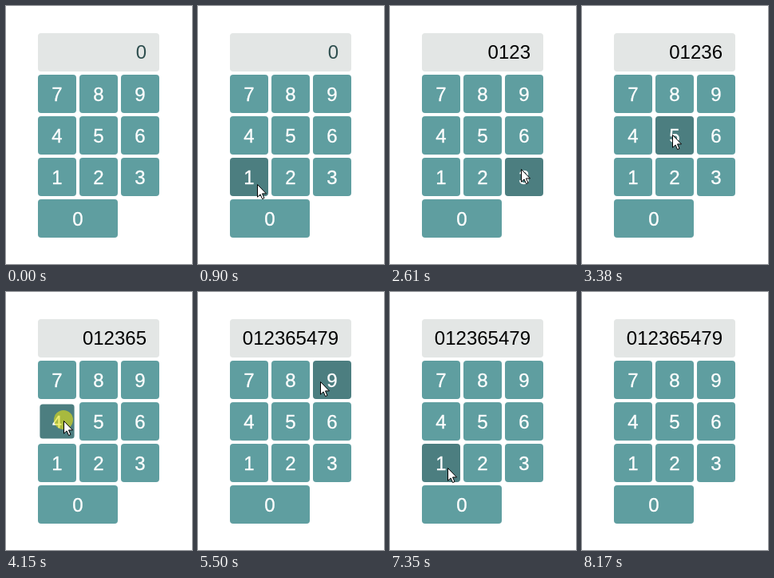
Recreate the animation shown at these times as an HTML page. Size 233 px wide and 323 px high, loop 9.9 s.

```html
<!DOCTYPE html>
<html lang="en">
<head>
<meta charset="utf-8">
<title>Keypad</title>
<style>
  html, body { margin: 0; width: 100%; height: 100%; overflow: hidden; background: #fff; }
  body { position: relative; font: 24px/48px "Liberation Sans", Arial, sans-serif; }
  div, svg { position: absolute; }
  #display {
    left: 40px; top: 34px; width: 136px; height: 48px; padding-right: 16px;
    border-radius: 4px; background: #e3e6e5; text-align: right;
  }
  .key {
    height: 48px; border-radius: 4px; background: #5f9ea0;
    color: #fff; line-height: 50px; text-align: center; -webkit-text-stroke: .3px #fff;
  }
  .key.hover { background: #4c7e80; }
  .key.down { transform: scale(.9); }
  #spot {
    left: -12px; top: -12px; width: 24px; height: 24px;
    border-radius: 50%; background: rgba(230, 225, 20, .6);
  }
  #pointer { left: 0; top: 0; }
  #pointer svg { left: 0; top: 1px; overflow: visible; }
</style>
</head>
<body>
<div id="display">0</div>
<div id="pointer">
  <div id="spot"></div>
  <svg width="13" height="20">
    <path d="M.5 .5V16.2L4.1 12.9 6.6 18.6 9 17.5 6.5 11.9H11.5Z" fill="#fff" stroke="#000"/>
  </svg>
</div>
<script>
const LOOP = 9900;
const TYPED = '12365479', FIRST = 1100, BEAT = 610, PRESS = 110;
const TOUR = '965210', TOUR_START = 5850, TOUR_BEAT = 370, REST = 100;
const OUTSIDE = [152, 318];

const display = document.getElementById('display');
const pointer = document.getElementById('pointer');
const spot = document.getElementById('spot');

// Column and row of a digit; row 0 holds 1 2 3, row -1 holds 0
const cell = n => n ? [(n - 1) % 3, Math.floor((n - 1) / 3)] : [0, -1];

const keys = Array.from({ length: 10 }, (_, n) => {
  const [col, row] = cell(n);
  const x = 40 + col * 52, y = 190 - row * 52, w = n ? 48 : 100;
  const el = document.createElement('div');
  el.className = 'key';
  el.textContent = n;
  el.style.cssText = `left:${x}px;top:${y}px;width:${w}px`;
  document.body.insertBefore(el, pointer);
  return { el, x, y, w };
});

// Where the hand rests on a key
function aim(n) {
  if (!n) return [122, 270];
  const [col, row] = cell(n);
  return [72 + col * (row ? 40.5 : 48), [219, 160, 111][row]];
}

// Stops as [time, point]: typing on a steady beat, then a swinging sweep back
function buildPath() {
  const path = [[540, OUTSIDE]];
  const stay = (from, to, point) => path.push([from, point], [to, point]);

  [...TYPED].forEach((d, i) => {
    const click = FIRST + i * BEAT;
    stay(click - 160, click + 210, aim(+d));
  });
  [...TOUR].forEach((d, i) => {
    const at = TOUR_START + i * TOUR_BEAT;
    const [x, y] = aim(+d);
    stay(at, at + REST, [x, y + 13 * Math.sin(i * Math.PI / 4)]);
  });
  const last = path[path.length - 1][1];
  path.push([7990, last], [8170, OUTSIDE]);
  return path;
}

const path = buildPath();
const ease = p => p * p * (3 - 2 * p);

function pointerAt(t) {
  if (t < path[0][0] || t >= path[path.length - 1][0]) return null;
  const i = path.findIndex(([at]) => at > t);
  const [t0, from] = path[i - 1], [t1, to] = path[i];
  const p = ease((t - t0) / (t1 - t0));
  return from.map((v, k) => Math.round(v + (to[k] - v) * p));
}

function render(t) {
  const pos = pointerAt(t);
  const beat = Math.floor((t - FIRST) / BEAT);
  const since = t - FIRST - beat * BEAT;
  const pressed = since < PRESS ? TYPED[beat] : undefined;
  const count = Math.max(0, since < PRESS ? beat : beat + 1);
  const text = '0' + TYPED.slice(0, count);

  if (display.textContent !== text) display.textContent = text;
  display.style.color = count ? '#000' : '#2f4f4f';

  keys.forEach(({ el, x, y, w }, n) => {
    const over = !!pos && pos[0] >= x && pos[0] < x + w && pos[1] >= y && pos[1] < y + 48;
    el.classList.toggle('hover', over);
    el.classList.toggle('down', pressed === String(n));
  });

  pointer.style.display = pos ? '' : 'none';
  if (pos) pointer.style.transform = `translate(${pos[0]}px, ${pos[1]}px)`;
  spot.style.display = pressed ? '' : 'none';
}

const start = performance.now();
function tick() {
  render((performance.now() - start) % LOOP);
  requestAnimationFrame(tick);
}
tick();
</script>
</body>
</html>
```
